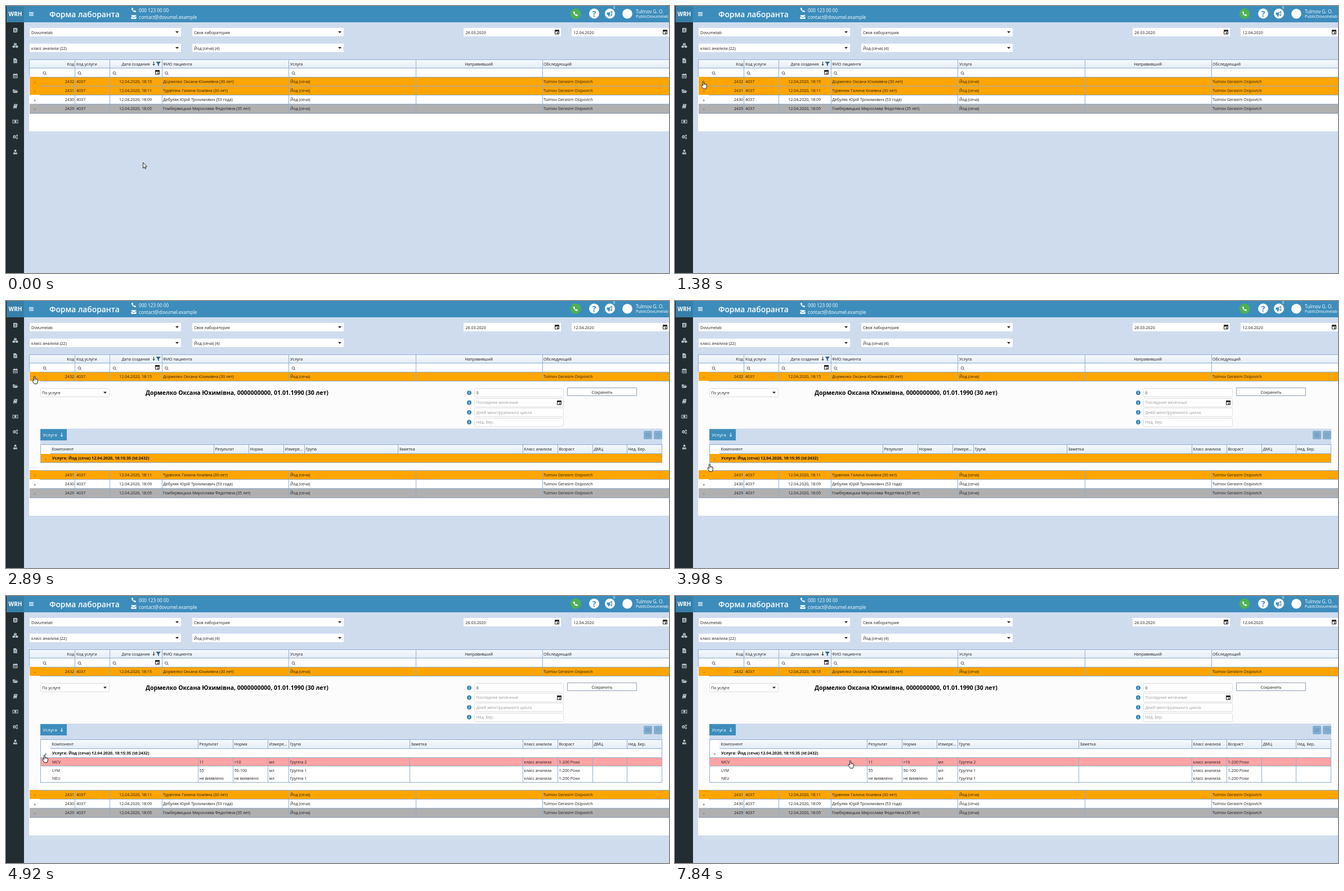
Recreate the animation shown at these times as an HTML page with a canvas. Size 1178x475 px, loop 7.99 s.

```html
<!DOCTYPE html>
<html lang="ru">
<head>
<meta charset="utf-8">
<title>Форма лаборанта</title>
<style>
html, body { margin: 0; width: 100%; height: 100%; overflow: hidden; background: #cfdcee; }
canvas { display: block; }
</style>
</head>
<body>
<canvas id="stage" width="1178" height="475"></canvas>
<script>
const c = document.getElementById('stage').getContext('2d');
const LOOP = 7990, W = 1178, H = 475;
const FONT = '"Open Sans", "Noto Sans", sans-serif';
const BLUE = '#3c8dbc', PALE = '#cfdcee', LINE = '#8fadd0', INK = '#1c1c1c',
      ORANGE = '#ffa500', GREY = '#b0b0b0', ICON = '#b8c7ce';
const DOCTOR = 'Tulmov Gerasim Osipovich', SERVICE = 'Йод (сеча)';

const PATIENTS = [
  { id: 2432, time: '18:15', name: 'Дормелко Оксана Юхимівна (30 лет)', fill: ORANGE, mark: '#b9811c' },
  { id: 2431, time: '18:11', name: 'Турвінюк Галина Хомівна (30 лет)', fill: ORANGE, mark: '#b9811c' },
  { id: 2430, time: '18:09', name: 'Дебуляк Юрій Трохимович (53 года)', fill: '#fff', mark: '#666' },
  { id: 2429, time: '18:05', name: 'Гомбервицька Мирослава Федотівна (35 лет)', fill: GREY, mark: '#858585' }
];

const RESULTS = [
  ['MCV', '11', '<10', 'Группа 2'],
  ['LYM', '55', '50-100', 'Группа 1'],
  ['NEU', 'не виявлено', 'не виявлено', 'Группа 1']
];

// Pointer stops: time, left, top, shape
const STOPS = [
  [0, 243, 278, arrow], [270, 217, 259, arrow], [390, 171, 232, arrow], [520, 124, 194, arrow],
  [640, 87, 165, hand], [790, 66, 148, hand], [910, 52, 137, hand], [1070, 46, 133, hand],
  [3290, 48, 152, hand], [3410, 54, 179, hand], [3560, 56, 224, hand], [3680, 60, 268, arrow],
  [3840, 55, 286, hand], [3980, 57, 289, hand], [4100, 60, 290, hand], [4220, 63, 285, hand],
  [4380, 64, 282, hand], [5540, 66, 283, hand], [5690, 100, 290, hand], [5810, 144, 301, hand],
  [5960, 217, 314, hand], [6110, 284, 318, hand], [6260, 318, 309, hand], [6380, 341, 305, hand],
  [6530, 354, 295, hand], [6940, 358, 308, hand], [7090, 357, 314, hand], [7210, 359, 322, hand],
  [7330, 361, 328, hand], [7600, 349, 319, hand], [7720, 327, 304, hand], [7840, 307, 292, hand]
];

function box(x, y, w, h, fill) {
  c.fillStyle = fill;
  c.fillRect(x, y, w, h);
}

function frame(x, y, w, h, stroke, fill, r = 0) {
  c.beginPath();
  c.roundRect(x + .5, y + .5, w - 1, h - 1, r);
  if (fill) { c.fillStyle = fill; c.fill(); }
  c.strokeStyle = stroke;
  c.lineWidth = 1;
  c.stroke();
}

function disc(x, y, r, fill) {
  c.fillStyle = fill;
  c.beginPath();
  c.arc(x, y, r, 0, 7);
  c.fill();
}

function poly(points, fill) {
  c.fillStyle = fill;
  c.beginPath();
  for (let i = 0; i < points.length; i += 2) c.lineTo(points[i], points[i + 1]);
  c.closePath();
  c.fill();
}

// Text centred vertically on y
function text(s, x, y, { size = 7.1, weight = 400, color = INK, align = 'left' } = {}) {
  c.font = `${weight} ${size}px ${FONT}`;
  c.fillStyle = color;
  c.textAlign = align;
  c.fillText(s, x, Math.round(y + size * .36));
}

function shape(d, x, y, fill, stroke, width = 1) {
  const p = new Path2D(d);
  c.save();
  c.translate(x, y);
  if (fill) { c.fillStyle = fill; c.fill(p, 'evenodd'); }
  if (stroke) { c.strokeStyle = stroke; c.lineWidth = width; c.lineJoin = 'round'; c.stroke(p); }
  c.restore();
}

const hline = (x, y, w, color = LINE) => box(x, y, w, 1, color);
const vline = (x, y, h, color = LINE) => box(x, y, 1, h, color);
const caret = (x, y) => poly([x - 3, y - 1.5, x + 3, y - 1.5, x, y + 1.8], '#222');

function expander(x, y, open, color) {
  poly(open ? [x - 2, y - 1, x + 2, y - 1, x, y + 1.3] : [x - 1, y - 2, x + 1.3, y, x - 1, y + 2], color);
}

function calendar(x, y) {
  frame(x - 4, y - 4, 8, 8, '#222', '#fff');
  box(x - 4, y - 4, 8, 3, '#222');
  box(x, y + .5, 2.2, 2, '#222');
}

function lens(x, y) {
  c.strokeStyle = '#444';
  c.lineWidth = .9;
  c.beginPath();
  c.arc(x - .6, y - .8, 2.3, 0, 7);
  c.moveTo(x + 1.1, y + .9);
  c.lineTo(x + 3.2, y + 3);
  c.stroke();
}

function downArrow(x, y, color) {
  shape('M0-3.5V3M-2 1L0 3.2L2 1', x, y, null, color, 1);
}

function phone(x, y) {
  shape('M-4-3.2L-2.2-4.2L-.6-1.4L-1.7-.4Q-.8 1 .5 1.7L1.5.6L4.2 2.2L3.3 4Q1.5 4.6-1 2.6Q-4.4-.4-4-3.2Z', x, y, '#fff');
}

function arrow(x, y) {
  shape('M.5.5V10.6L2.8 8.4L4.3 11.8L5.8 11.1L4.3 7.9H7.5Z', x, y, '#fff', '#111', .9);
}

function hand(x, y) {
  shape('M3.4 9V1.7Q3.4.6 4.4.6T5.4 1.7V5.5Q6 4.8 7 5.7Q7.9 5.2 8.6 6.2Q10.4 5.8 10.4 7.8V10L9.2 14.3H4.2L1.2 9.8Q.2 8.3 1.3 7.7T3.4 9Z',
    x, y, '#fff', '#111', .95);
  shape('M5.4 5.5V8M7 6V8M8.7 6.4V8', x, y, null, '#222', .5);
}

function sidebar() {
  box(0, 0, 32, 29, '#367fa9');
  box(0, 29, 32, H, '#222d32');
  vline(0, 0, H, '#12191c');
  text('WRH', 16.5, 14, { size: 10, weight: 700, color: '#fff', align: 'center' });
  const icons = [
    'M-3.5-4H3V4H-3.5ZM-.3-2.5A1.2 1.2 0 1 0-.2-2.5ZM-2.2 2.2H1.8Q1.6.4-.2.4T-2.2 2.2ZM3.6-3H4.4V-1H3.6ZM3.6 0H4.4V2H3.6Z',
    'M0-4.5L2.4-3.4V-.8L0 .3L-2.4-.8V-3.4ZM-2.7 0L-.3 1.1V3.5L-2.7 4.5L-5 3.5V1.1ZM2.7 0L5 1.1V3.5L2.7 4.5L.3 3.5V1.1ZM0-3.3L1.2-2.8L0-2.2L-1.2-2.8Z',
    'M-3.2-4.2H.8L3.2-1.8V4.2H-3.2ZM-1.8-.8H1.8V0H-1.8ZM-1.8 1.2H1.8V2H-1.8Z',
    'M-4-3.2H-2.4V-4.3H-1.2V-3.2H1.2V-4.3H2.4V-3.2H4V4.2H-4ZM-3-1H-1.2V.8H-3ZM-.8-1H.8V.8H-.8ZM1.2-1H3V.8H1.2ZM-3 1.4H-1.2V3.2H-3ZM-.8 1.4H.8V3.2H-.8ZM1.2 1.4H3V3.2H1.2Z',
    'M-4.5-3H-1.4L-.6-2H3V-.8H-2.4L-4.5 2.4ZM-2-.2H5L3 3H-4.2Z',
    'M-2-4H4L2.2 3.8H-4L-3.6 1.8ZM-1-2.5L-1.2-1.7H2.2L2.4-2.5ZM-3 2.2L-3.1 3H1.5L1.7 2.2Z',
    'M-5-3.2H5V3.2H-5ZM-4-2.2V2.2H4V-2.2ZM0-2A2 2 0 1 0 .1-2Z',
    'M-1.6-2.6A2.7 2.7 0 1 0-1.5-2.6ZM-1.6-1A1.1 1.1 0 1 1-1.7-1ZM2.9-4A1.7 1.7 0 1 0 3-4ZM2.9-3A.7.7 0 1 1 2.8-3ZM2.9.6A1.7 1.7 0 1 0 3 .6ZM2.9 1.6A.7.7 0 1 1 2.8 1.6Z',
    'M0-4.2A2 2 0 1 0 .1-4.2ZM-3.6 4Q-3.6.2-1.6.2L0 1.7L1.6.2Q3.6.2 3.6 4ZM1.2 1.8H2.2V2.8H1.2Z'
  ];
  icons.forEach((d, i) => shape(d, 16.5, 43 + i * 27.1, ICON));
}

function topbar() {
  box(32, 0, W, 29, BLUE);
  for (let i = 0; i < 3; i++) box(41, 11 + i * 2.6, 8, 1.3, '#fff');
  text('Форма лаборанта', 77, 14.8, { size: 13.8, weight: 600, color: '#fff' });
  phone(227, 7);
  text('000 123 00 00', 236, 8, { size: 8.2, color: '#fff' });
  shape('M-4.5-3.2H4.5V-2.2L0 1L-4.5-2.2ZM-4.5-1.1L0 2.1L4.5-1.1V3.5H-4.5Z', 227, 19.5, '#fff');
  text('contact@dovumel.example', 236, 20, { size: 8.2, color: '#fff' });

  disc(1012, 13.7, 9.4, '#4db251');
  phone(1012, 13.7);
  disc(1045, 13.5, 9, '#fff');
  text('?', 1045, 13.6, { size: 14, weight: 700, color: BLUE, align: 'center' });
  disc(1073, 13.5, 9, '#fff');
  shape('M-5.5-1.8L-1-2L4-5V4.6L-1 2L-.3 5H-2.6L-3.5 2H-5.5ZM0-1.2V1.3L2.8 2.8V-2.9Z', 1073, 13.5, BLUE);
  text('0', 1080.5, 2.2, { size: 6.4, color: '#fff', align: 'center' });
  disc(1104, 13.7, 8.8, '#fff');
  text('Tulmov G. O.', 1119, 9.6, { size: 8.4, color: '#fff' });
  text('PublicDovumelab', 1119, 18.5, { color: '#fff' });
}

function filters() {
  const select = (s, x, y) => {
    box(x, y, 269, 15, '#fff');
    text(s, x + 3, y + 8);
    caret(x + 262, y + 7.5);
  };
  const date = (s, x) => {
    box(x, 39, 173, 15, '#fff');
    text(s, x + 3.5, 47);
    calendar(x + 166, 46.5);
  };
  select('Dovumelab', 42, 39);
  select('Своя лаборатория', 331, 39);
  select('класс анализа (22)', 42, 67);
  select(SERVICE + ' (4)', 331, 67);
  date('26.03.2020', 813);
  date('12.04.2020', 1005);
}

const COLUMNS = [122, 184, 277, 502, 728, 953];

function header(x, y, w, h) {
  const g = c.createLinearGradient(0, y, 0, y + h);
  g.addColorStop(0, '#f7fafd');
  g.addColorStop(1, '#e3ecf6');
  box(x, y, w, h, g);
  hline(x, y, w);
  hline(x, y + h - 1, w);
}

function gridHead() {
  header(42, 95, W, 16);
  box(42, 111, W, 15, '#fff');
  for (const x of COLUMNS) vline(x, 95, 31);
  vline(41, 95, 31);
  text('Код', 121, 103, { align: 'right' });
  text('Код услуги', 125, 103);
  text('Дата создания', 255.5, 103, { align: 'right' });
  downArrow(262.5, 102.5, '#222');
  poly([266.5, 99, 275, 99, 271.8, 103, 271.8, 107, 269.7, 105.5, 269.7, 103], '#2d6496');
  text('ФИО пациента', 279, 103);
  text('Услуга', 505, 103);
  text('Направивший', 840, 103, { align: 'center' });
  text('Обследующий', 955, 103);
  for (const x of [69, 131, 193, 285.5, 511]) lens(x, 120);
  calendar(269, 118);
}

function patientRow(p, y, open) {
  box(42, y, W, 16, p.fill);
  hline(60, y, W);
  hline(60, y + 16, W);
  hline(42, y + 16, 18, p.fill === GREY ? GREY : '#fff');
  for (const x of COLUMNS) vline(x, y, 16);
  expander(51.5, y + 10, open, p.mark);
  const mid = y + 8;
  text(p.id, 121, mid, { align: 'right' });
  text('4037', 125, mid);
  text('12.04.2020, ' + p.time, 259, mid, { align: 'right' });
  text(p.name, 279, mid);
  text(SERVICE, 505, mid);
  text(DOCTOR, 955, mid);
}

function detailForm() {
  frame(61, 155, 123, 16, '#dddddd', '#fff', 2);
  text('По услуге', 64, 163.3);
  caret(176, 163);
  text('Дормелко Оксана Юхимівна, 0000000000, 01.01.1990 (30 лет)', 248, 163,
    { size: 10.45, weight: 700, color: '#000' });
  ['0', 'Последние месячные', 'Дней менструального цикла', 'Нед. Бер.'].forEach((s, i) => {
    const y = 163.3 + i * 17.4;
    disc(823, y, 3.9, '#2b80b5');
    box(822.4, y - .6, 1.2, 2.8, '#fff');
    box(822.4, y - 2.3, 1.2, 1.1, '#fff');
    frame(832, Math.round(y - 8), 159, 16, '#dedede', '#fff', 2);
    text(s, 835.5, y, { color: i ? '#999' : '#333' });
  });
  calendar(983, 181);
  frame(997, 154, 124, 15, '#8f9fb5', '#fff');
  text('Сохранить', 1059, 162, { align: 'center' });

  box(61, 227, 1105, 29, PALE);
  box(61, 228, 47, 20, BLUE);
  text('Услуга', 65.5, 238.3, { size: 8, color: '#fff' });
  downArrow(99, 238, '#fff');
  for (const x of [1133, 1151]) {
    c.fillStyle = '#83aed0';
    c.beginPath();
    c.roundRect(x, 231, 15, 15, 2);
    c.fill();
  }
  shape('M-3.5-3H3.5V3H-3.5ZM-2-3V-.5H2V-3M-2 3V1H2V3', 1140.5, 238.5, null, '#6d98bc', .9);
  shape('M-3-2V.2H-.8M-2.8 0A3 3 0 1 1-1 2.6', 1158.5, 238.5, null, '#6d98bc', .9);
}

function innerHead(seps) {
  header(61, 255, 1105, 17);
  box(61, 256, 18, 16, '#fff');
  const names = ['Результат', 'Норма', 'Измере...', 'Група', 'Заметка',
    'Класс анализа', 'Возраст', 'ДМЦ', 'Нед. Бер.'];
  text('Компонент', 81.5, 263.7);
  seps.forEach((x, i) => {
    vline(x, 256, 15);
    text(names[i], x + 2.5, 263.7);
  });
}

function groupRow(fill, open, focused) {
  box(61, 272, 1105, 16, fill);
  hline(61, 287, 1105);
  text(`Услуга: ${SERVICE} 12.04.2020, 18:15:35 (id:2432)`, 82, 279.2, { size: 7.25, weight: 700, color: '#111' });
  expander(70.5, 281.5, open, fill === ORANGE ? '#b9811c' : '#666');
  if (focused) {
    c.strokeStyle = '#3578b0';
    c.lineWidth = 2;
    c.strokeRect(62, 272, 1103, 15);
  }
}

function resultRows(seps) {
  RESULTS.forEach(([name, value, norm, group], i) => {
    const y = 288 + Math.round(i * 14.7), mid = y + 7.3;
    box(61, y, 1105, 15, i ? '#fff' : '#ffa4a4');
    hline(i ? 79 : 61, y + 14, i ? 1087 : 1105);
    for (const x of seps) vline(x, y, 15);
    text(name, 82, mid);
    [value, norm, 'мл', group, '', 'класс анализа', '1-200 Роки'].forEach((s, k) =>
      text(s, seps[k] + 2.5, mid));
  });
  hline(61, 331, 1105);
}

function detail(t, shift) {
  box(42, 143, W, shift, '#fcfcfc');
  detailForm();
  const tail = [918, 980, 1042, 1103];
  if (t < 2890) {
    frame(61, 255, 1105, 63, LINE, '#fcfcfc');
    hline(61, 256, 1105, '#a9c0dc');
    return;
  }
  if (t < 4920) {
    innerHead([369, 431, 493, 530, 696, ...tail]);
    groupRow(ORANGE, t >= 4650, t >= 4790);
  } else {
    const seps = [341, 403, 465, 502, 717, ...tail];
    innerHead(seps);
    groupRow('#fff', true, false);
    resultRows(seps);
  }
  const bottom = t < 4920 ? 288 : 332;
  vline(61, 255, bottom - 255);
  vline(1165, 255, bottom - 255);
}

function draw(t) {
  const shift = t < 2740 ? 0 : t < 2890 ? 189 : t < 4920 ? 159 : 203;
  box(0, 0, W, H, PALE);
  sidebar();
  topbar();
  filters();
  box(41, 95, W, 128 + shift, '#fff');
  gridHead();
  if (shift) detail(t, shift);
  PATIENTS.forEach((p, i) => patientRow(p, 126 + i * 16 + (i ? shift : 0), !i && shift > 0));
  hline(42, 190 + shift, W, '#9a9fa8');
  hline(42, 191 + shift, W, '#b5c9e2');
  const [, x, y, pointer] = STOPS.findLast(s => s[0] <= t);
  pointer(x, y);
}

function tick() {
  draw(performance.now() % LOOP);
  requestAnimationFrame(tick);
}
tick();
</script>
</body>
</html>
```
